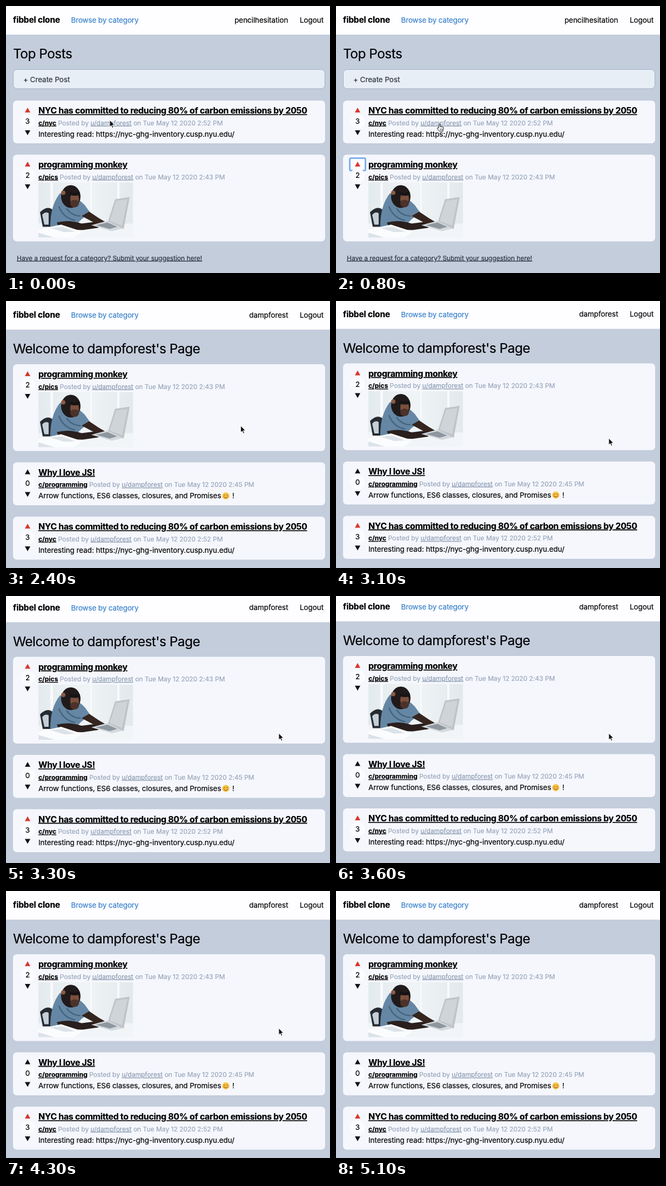
Recreate the animation shown at these times as an HTML page. Size 600 by 494 pixels, loop 5200 ms.

```html
<!DOCTYPE html>
<html lang="en">
<head>
<meta charset="utf-8">
<title>Post feed</title>
<style>
  html, body { margin: 0; width: 100%; height: 100%; overflow: hidden; background: #c4cddc; }
  svg { display: block; }
  text { font: 13.5px Inter, sans-serif; letter-spacing: -.005em; color: #000; }
  text, tspan { fill: currentColor; stroke: currentColor; stroke-width: .2px; }
  .brand { font-size: 15.5px; font-weight: 700; letter-spacing: -.01em; }
  .nav { color: #3a82cc; letter-spacing: -.011em; }
  .h1 { font-size: 24.5px; letter-spacing: -.023em; }
  .title { font-size: 15.9px; font-weight: 700; letter-spacing: -.019em; text-decoration: underline; }
  .meta { font-size: 12px; letter-spacing: .001em; color: #98a5b9; }
  .cat { font-weight: 700; color: #000; text-decoration: underline; }
  .user { color: #8b9ab0; text-decoration: underline; }
  .create { color: #2b3340; }
  .request { font-size: 12px; letter-spacing: -.002em; color: #2b3340; text-decoration: underline; }
  .end { text-anchor: end; }
  .mid { text-anchor: middle; }
  .up { fill: #111; }
  .up.on { fill: #dc352c; }
</style>
</head>
<body>
<svg id="stage" width="600" height="494" viewBox="0 0 600 494"></svg>
<script>
const LOOP = 5200, STEP = 100;
const AUTHOR = 'dampforest', VISITOR = 'pencilhesitation';

const text = (x, y, cls, s) => `<text x="${x}" y="${y}" class="${cls}">${s}</text>`;
const shape = (d, fill, extra = '') => `<path d="${d}" fill="${fill}" ${extra}/>`;

const photo = `<svg x="60" y="51.5" width="175" height="102">
  <rect width="175" height="102" fill="url(#wall)"/>
  ${shape('M22 0h5v70h-5zM96 0h3v70h-3zM146 0h4v70h-4z', '#f8fafb')}
  ${shape('M0 76H175V102H0z', '#f1f5f7')}
  ${shape('M3 55Q16 42 26 50V82H8z', '#262b32')}
  ${shape('M7 60Q13 53 19 57V78H11z', '#c3ced6')}
  ${shape('M22 82Q22 42 40 20Q62 18 86 42L96 56L80 68L68 80L42 84z', '#6587a5')}
  ${shape('M38 44Q46 66 68 70M52 48Q62 62 78 62', 'none', 'stroke="#45667f" stroke-width="2.5"')}
  ${shape('M34 74Q56 68 80 76L104 73L120 78L110 84L82 88L40 87z', '#2a1f1c')}
  ${shape('M80 62L94 54L112 66L124 73L112 79z', '#35251f')}
  <ellipse cx="60" cy="26" rx="18" ry="21" fill="#211a1a"/>
  <ellipse cx="67" cy="30" rx="8" ry="12" fill="#7a4f3d"/>
  <ellipse cx="67" cy="39" rx="8" ry="7" fill="#4c3229"/>
  <circle cx="46" cy="19" r="4" fill="#8a5b48"/>
  ${shape('M58 18h19v5q-9 3-19 0z', '#171416')}
  ${shape('M0 87L42 78L82 91L66 102H0z', '#fbfcfd')}
  ${shape('M0 93L30 102H0zM22 84l26 8 20-1-24-9z', '#dbe3e9')}
  ${shape('M98 79L128 71L157 85L136 90z', '#d4d9dd')}
  ${shape('M106 79L128 74L146 82L132 86z', '#8e979f')}
  ${shape('M129 72L142 31L169 27L158 86z', '#bfc4c8')}
  ${shape('M132 71L144 34L165 31L155 80z', '#d0d4d8')}
</svg>`;

const smiley = `<g transform="translate(407 62)">
  <circle r="6.5" fill="#f9c440"/>
  <circle cx="-4" cy="1.5" r="1.6" fill="#f39a4a"/><circle cx="4" cy="1.5" r="1.6" fill="#f39a4a"/>
  ${shape('M-3.8-1q1.3-2 2.6 0M1.2-1q1.3-2 2.6 0M-3 2q3 3.4 6 0', 'none', 'stroke="#6b3d14"')}
</g>`;

function card(y, height, { title, cat, time, votes, body }, upClass, ring = '') {
  return `<g transform="translate(0 ${y})">
    <rect x="13" width="578" height="${height}" rx="7" fill="#f5f7fd"/>${ring}
    <circle cx="40" cy="38.5" r="13.3" fill="#fbfcff"/>
    <path d="M35 22L40 13L45 22z" class="up ${upClass}"/>
    ${text(40, 43.2, 'mid', votes)}
    ${shape('M35 55H45L40 64z', '#111')}
    ${text(60, 24.2, 'title', title)}
    <text x="60" y="45.6" class="meta"><tspan class="cat">c/${cat}</tspan> Posted by <tspan class="user">u/${AUTHOR}</tspan> on Tue May 12 2020 ${time} PM</text>
    ${body}
  </g>`;
}

const monkey = { title: 'programming monkey', cat: 'pics', time: '2:43', votes: 2, body: photo };
const script = { title: 'Why I love JS!', cat: 'programming', time: '2:45', votes: 0,
  body: text(60, 66.8, '', 'Arrow functions, ES6 classes, closures, and Promises') + smiley + text(419, 66.8, '', '!') };
const city = { title: 'NYC has committed to reducing 80% of carbon emissions by 2050', cat: 'nyc', time: '2:52', votes: 3,
  body: text(60, 66.8, '', 'Interesting read: https://nyc-ghg-inventory.cusp.nyu.edu/') };

const focusRing = '<rect id="ring" x="25.5" y="6.5" width="29" height="23" rx="2" fill="#fbfcff" stroke="#7db1ee" stroke-width="3"/>';

const stage = document.getElementById('stage');
stage.innerHTML = `
  <defs><linearGradient id="wall"><stop stop-color="#e3eaed"/><stop offset=".5" stop-color="#f0f4f6"/><stop offset="1" stop-color="#e2e9ec"/></linearGradient></defs>
  <rect width="600" height="494" fill="#c4cddc"/>
  <g id="page">
    <rect y="-10" width="600" height="63" fill="#fefdff"/>
    ${text(13, 31, 'brand', 'fibbel clone')}
    ${text(120.5, 31.2, 'nav', 'Browse by category')}
    ${text(588, 30.7, 'end', 'Logout')}
    <g id="home">
      ${text(522.5, 30.7, 'end', VISITOR)}
      ${text(13, 97, 'h1', 'Top Posts')}
      <rect x="13.5" y="117.5" width="577" height="35.5" rx="7" fill="#e8eef5" stroke="#9bb0c7"/>
      ${text(32, 140.5, 'create', '+ Create Post')}
      ${card(175, 79, city, 'on')}
      ${card(275, 160.5, monkey, 'on', focusRing)}
      ${text(20, 470.5, 'request', 'Have a request for a category? Submit your suggestion here!')}
    </g>
    <g id="profile">
      ${text(522.5, 30.7, 'end', AUTHOR)}
      ${text(13, 97, 'h1', `Welcome to ${AUTHOR}'s Page`)}
      ${card(117, 160.5, monkey, 'voted')}
      ${card(298.5, 79.5, script, '')}
      ${card(399, 79.5, city, 'voted')}
    </g>
  </g>
  <g id="cursor" stroke-linejoin="round">
    ${shape('M0 0V12.6L2.9 10L4.9 14.6L7 13.7L5 9.2H9z', '#111', 'id="arrow" stroke="#fff" stroke-width="1"')}
    <g id="hand" stroke="#111" stroke-width="1">
      ${shape('M-1.2 8V1.2a1.2 1.2 0 0 1 2.4 0V5.2l5.2 1.2q1.6.5 1.3 2.4L6.6 11.5V14H-.2L-3.8 9.2q-.6-1.8 1-1.6z', '#fff')}
      ${shape('M1.5 9v3M3.3 9v3M5.1 9v3', 'none', 'stroke-width=".7"')}
    </g>
  </g>`;

const el = id => document.getElementById(id);
const show = (id, on) => el(id).style.display = on ? '' : 'none';
const smooth = k => k * k * (3 - 2 * k);

// Keys are [time, ...values]; returns the blended values at t.
function track(keys, t, ease = k => k) {
  const next = keys.findIndex(key => key[0] > t);
  if (next < 0) return keys.at(-1).slice(1);
  const a = keys[next - 1], b = keys[next];
  const k = ease((t - a[0]) / (b[0] - a[0]));
  return a.slice(1).map((v, i) => v + (b[i + 1] - v) * k);
}

const pointer = [[0, 192, 211], [300, 192, 211], [500, 191.5, 217.7], [1800, 191.5, 217.7],
  [2400, 434.5, 230.7], [2500, 434.5, 230.7], [3000, 505, 253.7]];
const scroll = [[0, 0], [3000, 0], [3400, -6], [3800, -6], [4000, -3.5], [4200, 0]];

function draw(now) {
  const t = Math.floor(now % LOOP / STEP) * STEP;
  const onHome = t < 1400, pointing = t >= 400 && t < 1900;
  show('home', onHome);
  show('profile', !onHome);
  show('ring', t >= 300 && t < 1100);
  show('hand', pointing);
  show('arrow', !pointing);
  show('cursor', t < 4500);
  document.querySelectorAll('.voted').forEach(p => p.classList.toggle('on', t >= 2000));
  el('page').setAttribute('transform', `translate(0 ${track(scroll, t)[0]})`);
  el('cursor').setAttribute('transform', `translate(${track(pointer, t, smooth)})`);
}

const start = performance.now();
(function tick() {
  draw(performance.now() - start);
  requestAnimationFrame(tick);
})();
</script>
</body>
</html>
```
